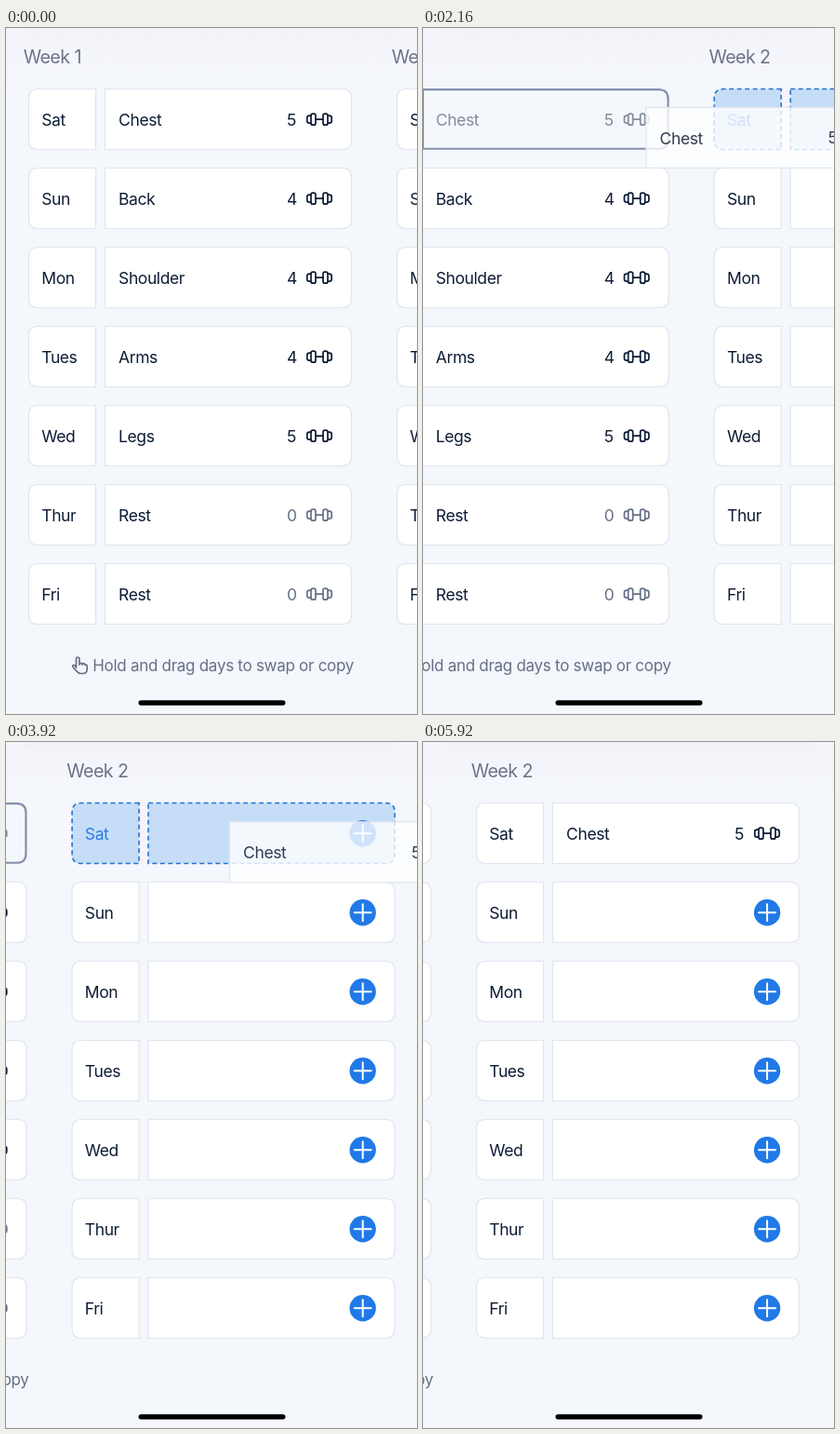
Recreate the animation shown at these times as an HTML page. Size 442 px wide and 737 px high, loop 6 s.

```html
<!DOCTYPE html>
<html lang="en">
<head>
<meta charset="utf-8">
<title>Workout planner</title>
<style>
  html, body { margin: 0; width: 100%; height: 100%; overflow: hidden; background: #f4f7fb; }
  svg { display: block; width: 100vw; height: 100vh; }
  text { font-family: Inter, "Open Sans", sans-serif; font-size: 17.5px; font-weight: 400; letter-spacing: -.42px; fill: #0d1c35; }
  .title { font-size: 19.7px; letter-spacing: -.6px; fill: #6b7389; }
  .hint { font-size: 17px; letter-spacing: -.28px; fill: #667087; }
  .cell { fill: #fff; stroke: #e0e5ef; stroke-width: 1.2; }
  .icon { fill: none; stroke: #0d1c35; stroke-width: 1.7; stroke-linejoin: round; stroke-linecap: round; }
  .idle text { fill: #667087; }
  .idle .icon, .hand { stroke: #667087; }
  .gap { fill: #f6f3fb; visibility: hidden; }
  .lifted .cell { fill: #f4f7fb; stroke: #8490ac; stroke-width: 2.2; transform: translate(.7px, .7px) scale(.995, .978); }
  .lifted .content { opacity: .48; }
  .target .gap { visibility: visible; }
  .target .cell { fill: #c5ddf7; stroke: #2472d6; stroke-width: 1.6; stroke-dasharray: 5 3.5; }
  .target .day { fill: #2a7ce0; }
  .chip .cell { fill-opacity: .79; }
  .chip .content { opacity: .85; }
</style>
</head>
<body>
<svg id="stage" viewBox="0 0 442 737">
  <defs>
    <linearGradient id="back" x1="0" y1="0" x2="0" y2="1">
      <stop offset="0" stop-color="#f4f5fb"/>
      <stop offset=".1" stop-color="#f4f7fb"/>
      <stop offset="1" stop-color="#f4f7fb"/>
    </linearGradient>
    <linearGradient id="shade" x1="0" y1="0" x2="0" y2="1">
      <stop offset="0" stop-color="#edeff6"/>
      <stop offset="1" stop-color="#edeff6" stop-opacity="0"/>
    </linearGradient>
  </defs>
  <rect width="442" height="737" fill="url(#back)"/>
  <rect x="20" y="-12" width="402" height="27" rx="14" fill="url(#shade)"/>
  <g id="weeks"></g>
  <g id="chip" class="chip"></g>
  <rect x="142.5" y="722.2" width="158" height="5.6" rx="2.8" fill="#000"/>
</svg>
<script>
const LOOP = 6000, ROW = 85, TOP = 65.5, HEIGHT = 65, WEEK = 396;
const LIFT = 320, HOVER = 900, DROP = 5440;
const days = ["Sat", "Sun", "Mon", "Tues", "Wed", "Thur", "Fri"];
const plan = [["Chest", 5], ["Back", 4], ["Shoulder", 4], ["Arms", 4], ["Legs", 5], ["Rest", 0], ["Rest", 0]];
const $ = id => document.getElementById(id);

const group = (body, attrs = "") => `<g ${attrs}>${body}</g>`;
const label = (x, y, text, cls = "") => `<text class="${cls}" x="${x}" y="${y}">${text}</text>`;

const leftCell = (x, w) =>
  `<path class="cell" d="M${x + w} 0H${x + 10}q-10 0-10 10v${HEIGHT - 20}q0 10 10 10H${x + w}z"/>`;
const rightCell = (x, w) =>
  `<path class="cell" d="M${x} 0H${x + w - 10}q10 0 10 10v${HEIGHT - 20}q0 10-10 10H${x}z"/>`;

const halfBell = `<rect x="4" y="-6" width="5" height="12" rx="2"/>
  <path d="M9.2-4h1.6q2.4 0 2.4 2.4v3.2q0 2.4-2.4 2.4h-1.6"/>`;
const dumbbell = group(`<path d="M-4 0H4"/>${halfBell}${group(halfBell, 'transform="scale(-1 1)"')}`,
  'class="icon" transform="translate(230.5 32.7)"');
const plus = group(`<circle r="14.2" fill="#2079e6"/>
  <path d="M-9 0H9M0-9V9" stroke="#fff" stroke-width="2" stroke-linecap="round"/>`,
  'transform="translate(230.6 32.7)"');

// Workout contents, relative to the left edge of the wide cell
const workout = ([name, count]) => group(label(14.6, 39.3, name) +
  group(label(195.6, 39, count) + dumbbell, count ? "" : 'class="idle"'), 'class="content"');

const row = (i, id, content) => group(
  `<rect class="gap" x="97" width="9" height="${HEIGHT}"/>` +
  leftCell(24.5, 72) + label(38.3, 39.3, days[i], "day") +
  group(rightCell(0, 265) + content, `id="${id}" transform="translate(106.5 0)"`),
  `id="${id}Row" transform="translate(0 ${TOP + i * ROW})"`);

const hand = `<path class="icon hand" d="M75.5 687v-9q0-2 1.7-2t1.7 2v6
  q0-1.6 1.5-1.6t1.5 1.6q0-1.3 1.4-1.3t1.5 1.5q2.4-.7 2.4 1.8v3q0 4.5-4.6 4.5h-2.2
  q-2.6 0-4.4-2.4l-4-4.6q-.8-1.4.5-2t3 2.5"/>`;

$("weeks").innerHTML =
  group(label(18.7, 37.5, "Week 1", "title") +
    days.map((_, i) => row(i, "first" + i, workout(plan[i]))).join("") +
    hand + label(93.2, 691, "Hold and drag days to swap or copy", "hint")) +
  group(label(18.7, 37.5, "Week 2", "title") +
    days.map((_, i) => row(i, "second" + i, i ? plus :
      group(plus, 'id="empty"') + group(workout(plan[0]), 'id="filled"'))).join(""),
    `transform="translate(${WEEK} 0)"`);
$("chip").innerHTML = rightCell(0, 265) + workout(plan[0]);

const progress = (t, a, b) => Math.min(1, Math.max(0, (t - a) / (b - a)));
const ease = p => p * p * (3 - 2 * p);
const mix = (a, b, p) => a + (b - a) * p;

// Piecewise linear curve through [time, value] points
function track(points, t) {
  const i = points.findIndex(p => p[0] > t);
  if (i < 0) return points[points.length - 1][1];
  const [a, b] = [points[i - 1], points[i]];
  return mix(a[1], b[1], progress(t, a[0], b[0]));
}

const scrollPoints = [[1608, 30], [1680, 40], [2640, 174.3], [3200, 252.3], [3920, 349.3], [4020, 362.3], [5440, 362.3], [5520, 363]];
const scrollAt = t => t < 1608 ? 30 * progress(t, 1180, 1608) ** 2 : track(scrollPoints, t);

function chipAt(t) {
  const out = ease(progress(t, 400, 1150));
  const back = ease(progress(t, 4000, 4440));
  const drift = progress(t, 1680, 2640);
  return [mix(106.5, 239.5, out) + drift - 82.5 * back, mix(TOP, 84.8, out) + drift - 1.5 * back];
}

function draw(t) {
  const dragging = t >= LIFT && t < DROP, dropped = t >= DROP;
  const show = (id, on) => $(id).setAttribute("visibility", on ? "visible" : "hidden");
  $("weeks").setAttribute("transform", `translate(${-scrollAt(t)} 0)`);
  $("chip").setAttribute("transform", `translate(${chipAt(t)})`);
  show("chip", dragging);
  show("empty", !dropped);
  show("filled", dropped);
  $("first0").classList.toggle("lifted", dragging);
  $("second0Row").classList.toggle("target", dragging && t >= HOVER);
}

const start = performance.now();
function tick() {
  draw((performance.now() - start) % LOOP);
  requestAnimationFrame(tick);
}
draw(0);
requestAnimationFrame(tick);
</script>
</body>
</html>
```
